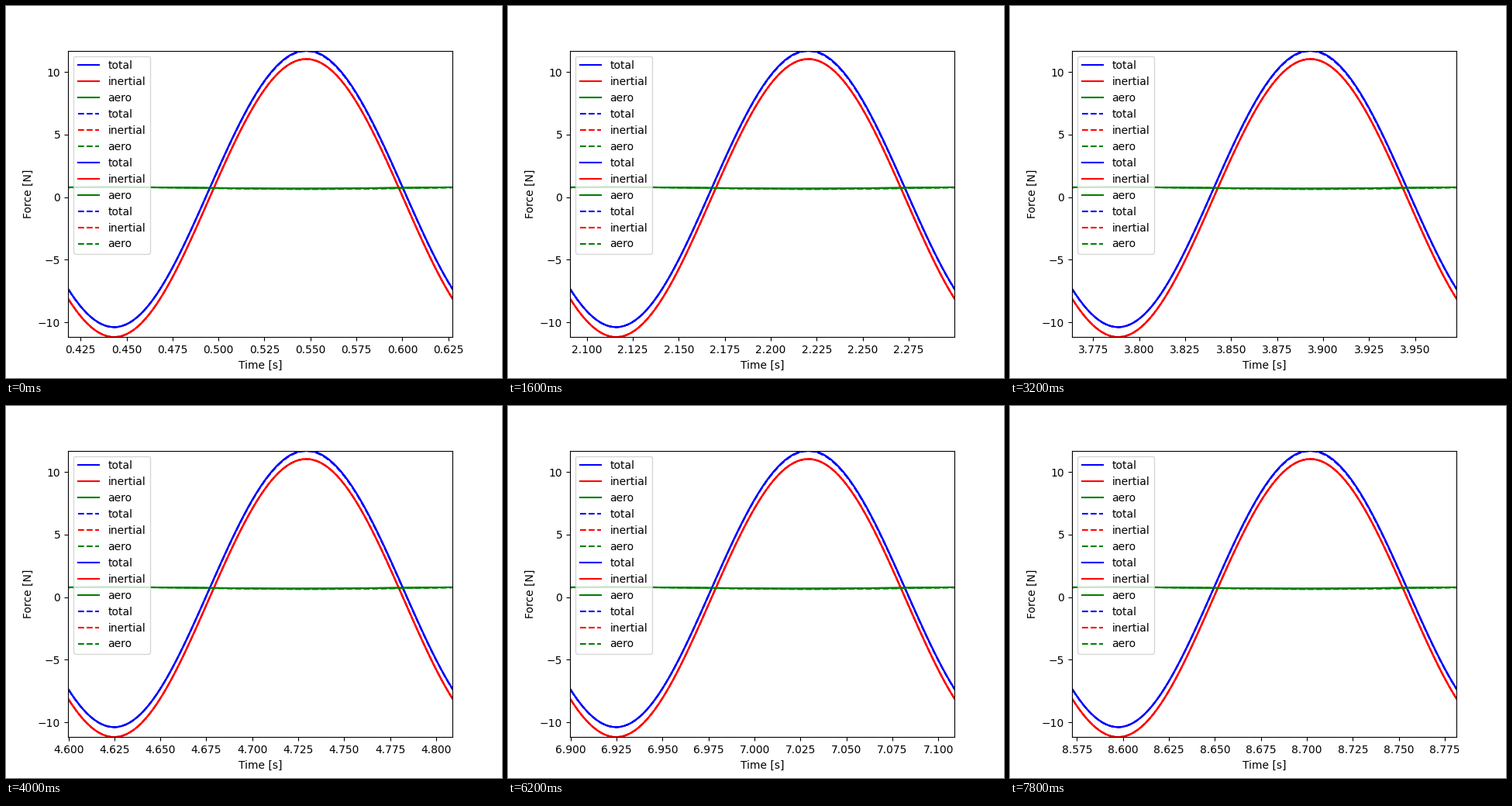
Recreate the animation shown at these times as a matplotlib script. Size 640x480 px, loop 8 s.

```python
import numpy as np
import matplotlib.pyplot as plt
from matplotlib.animation import FuncAnimation

FRAMES = 40
STEP_MS = 200
PERIOD = 0.20908   # one cycle, in seconds
FIRST = 2          # cycle shown by the first view
PEAK = 0.62        # place of the force peak within a cycle


def wave(phase, peak, harmonic=1):
    return np.cos(2 * np.pi * harmonic * (phase - peak))


def forces(phase, lag):
    inertial = 11.105 * wave(phase, PEAK) - 0.075 * wave(phase, PEAK, 2)
    aero = 0.74 + 0.055 * wave(phase, 0.1) - lag * (1 + wave(phase, 0.7))
    return inertial + aero, inertial, aero


phase = np.linspace(0, FRAMES + FIRST + 2, (FRAMES + FIRST + 2) * 100 + 1)
time = phase * PERIOD

fig, ax = plt.subplots(figsize=(6.4, 4.8), dpi=100)
for style, lag in [("-", 0), ("--", 0.022)] * 2:
    names = zip(("total", "inertial", "aero"), "brg", forces(phase, lag))
    for name, color, force in names:
        ax.plot(time, force, color + style, label=name)

ax.set_ylim(-11.18, 11.70)
ax.set_xlabel("Time [s]")
ax.set_ylabel("Force [N]")
ax.legend(loc="upper left")


def update(i):
    start = (i + FIRST) * PERIOD
    ax.set_xlim(start, start + PERIOD)
    return ax.lines


anim = FuncAnimation(fig, update, frames=FRAMES, interval=STEP_MS,
                     repeat=True, repeat_delay=0, blit=False)
plt.show()
```
